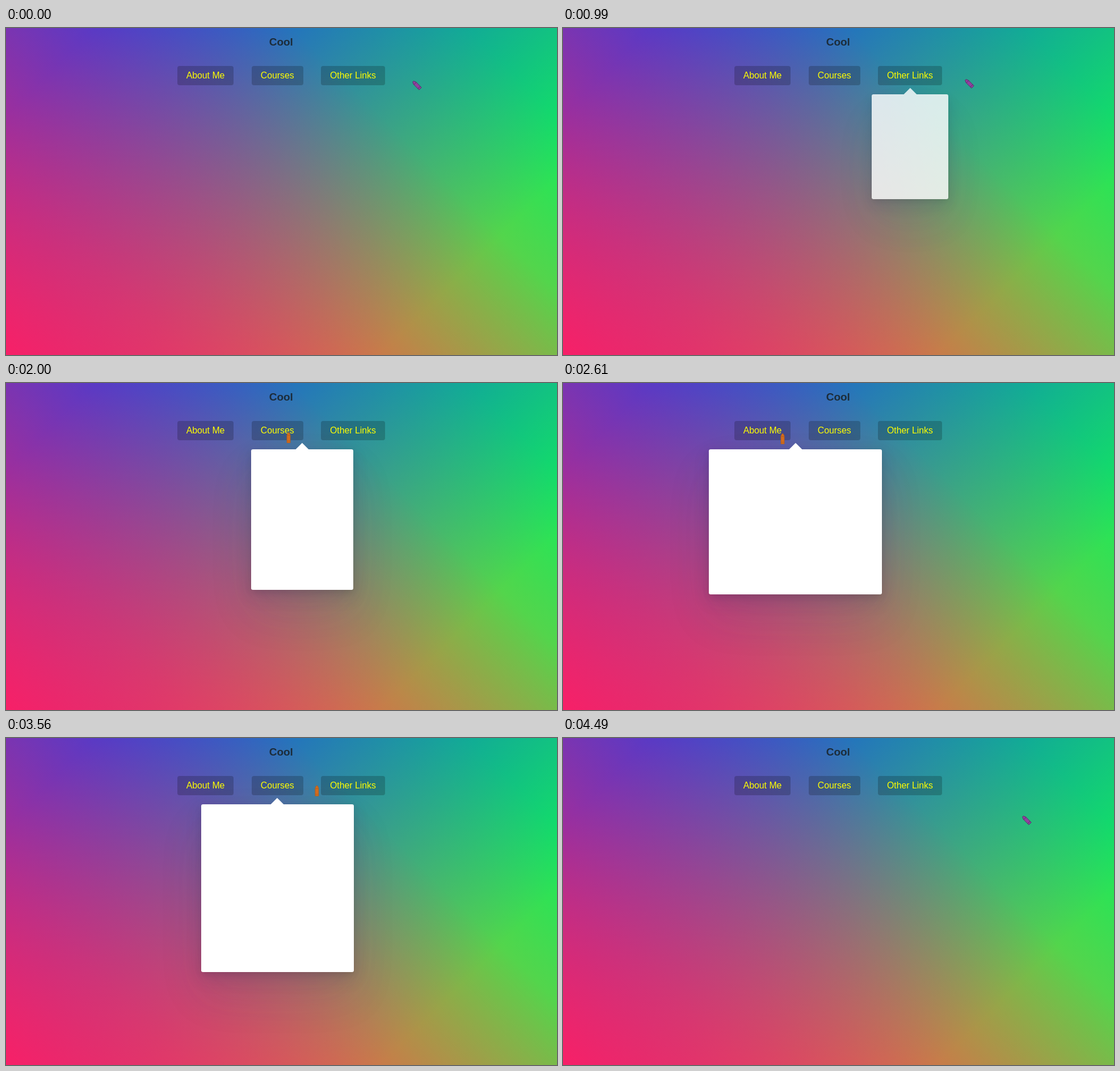
Write an HTML page that moves like this. It is 971 by 577 pixels and loops after 4.74 s.

```html
<!DOCTYPE html>
<html lang="en">
<head>
<meta charset="utf-8">
<title>Cool</title>
<style>
html, body { margin: 0; width: 100%; height: 100%; overflow: hidden; }
body {
  position: relative;
  font-family: "Liberation Sans", Arial, sans-serif;
  background:
    linear-gradient(rgba(128,128,128,.06), rgba(128,128,128,.06)),
    linear-gradient(45deg, hsla(340,100%,55%,1) 0%, hsla(340,100%,55%,0) 70%),
    linear-gradient(135deg, hsla(225,95%,50%,1) 10%, hsla(225,95%,50%,0) 80%),
    linear-gradient(225deg, hsla(140,90%,50%,1) 10%, hsla(140,90%,50%,0) 80%),
    hsl(35,95%,55%);
}
h2, nav, #panel, #links, svg { position: absolute; margin: 0; }
h2 {
  top: 14px; width: 969.6px; text-align: center;
  font-size: 19px; line-height: 22px; color: #1c2c3a;
}
nav {
  top: 67px; width: 969.6px;
  display: flex; justify-content: center; gap: 31.66px;
}
nav span {
  padding: 0 15.83px; border-radius: 4px;
  font-size: 15.83px; line-height: 34px;
  color: #ff0; background: rgba(0,0,0,.2);
}
#panel {
  background: #fff; border-radius: 3.2px;
  box-shadow: 0 40px 79px rgba(50,50,93,.1), 0 12px 28px rgba(50,50,93,.15), 0 4px 12px rgba(0,0,0,.1);
}
#panel::before {
  content: ""; position: absolute; top: -7.9px; left: calc(50% - 7.9px);
  width: 15.8px; height: 15.8px; background: #fff; transform: rotate(45deg);
}
#links { left: 559.6px; top: 130.6px; width: 103.8px; }
#links div {
  height: 30.4px; margin-bottom: 7.95px; padding-left: 7.9px;
  font-size: 12.66px; line-height: 30.4px; color: #fff; white-space: nowrap;
}
svg { inset: 0; width: 100%; height: 100%; }
</style>
</head>
<body>
<h2>Cool</h2>
<nav><span>About Me</span><span>Courses</span><span>Other Links</span></nav>
<div id="panel"></div>
<div id="links">
  <div style="background:#00aced">Quipple</div>
  <div style="background:#3b5998">Gladpine</div>
  <div style="background:#000">Blog</div>
  <div style="background:#ffc600">Course Catalog</div>
</div>
<svg>
  <g id="crayon" stroke-width=".8" stroke-linejoin="round">
    <path d="M-1 .5h2l2 4v14h-6v-14z"/>
    <path d="M-3 5.5h6M-3 15.5h6" fill="none"/>
  </g>
</svg>
<script>
const LOOP = 4740, STEP = 77;
const MOVE = 200, RESIZE = 300, FADE = 100, LINKS_DELAY = 165, LINKS_FADE = 500;
const $ = id => document.getElementById(id);

// panel box under a button's centre
const below = (center, width, height) => ({ left: center - width / 2, top: 117.3, width, height });
const start = { left: 0, top: 51, width: 79, height: 79 };
const about = below(351.5, 427.4, 118);
const courses = below(478.3, 269, 296);
const other = below(611.6, 135.4, 184.9);

// what the pointer enters, null when it leaves the menu
const hovers = [
  [460, other], [986, null], [1510, other], [1937, courses],
  [2567, about], [3122, courses], [3615, other], [4175, null]
];

// pointer turning points: time, x, y
const path = [
  [308, 717, 94], [700, 620, 88], [1001, 709, 91], [1290, 722, 97], [1750, 600, 88], [2002, 498, 87],
  [2618, 387, 89], [2950, 360, 89], [3157, 479, 86], [3850, 603, 82], [4100, 640, 86], [4340, 810, 138]
];

const clamp = x => Math.max(0, Math.min(1, x));
const mix = (a, b, p) => a + (b - a) * p;

// CSS "ease": cubic-bezier(.25, .1, .25, 1)
function ease(x) {
  x = clamp(x);
  let lo = 0, hi = 1;
  for (let i = 0; i < 24; i++) {
    const s = (lo + hi) / 2, r = 1 - s;
    if (.75 * s * r + s * s * s < x) lo = s; else hi = s;
  }
  return .3 * lo * (1 - lo) ** 2 + 3 * lo * lo * (1 - lo) + lo ** 3;
}

function menuAt(t) {
  const menu = { from: start, to: start, since: 0, wasOpen: false, open: false };
  for (const [time, box] of hovers) {
    if (time > t) break;
    menu.since = time;
    menu.wasOpen = menu.open;
    menu.open = !!box;
    menu.from = menu.to;
    menu.to = box || menu.to;
  }
  return menu;
}

function drawPanel({ from, to, since, wasOpen, open }, t) {
  const age = t - since, style = $("panel").style;
  // growing taller is quicker than shrinking
  const taller = to.height > from.height ? MOVE : RESIZE;
  const times = { left: MOVE, top: MOVE, width: RESIZE, height: taller };
  for (const k in times) style[k] = mix(from[k], to[k], ease(age / times[k])) + "px";
  style.opacity = mix(+wasOpen, +open, ease(age / FADE));
  $("links").style.opacity = open && to === other ? ease((age - LINKS_DELAY) / LINKS_FADE) : 0;
}

function drawCrayon(upright, t) {
  const i = path.findIndex(k => k[0] > t);
  const b = path.at(i), a = path[Math.max(0, i - 1)];
  const p = i < 1 ? 1 : (t - a[0]) / (b[0] - a[0]);
  const x = mix(a[1], b[1], p), y = mix(a[2], b[2], p);
  const g = $("crayon");
  g.setAttribute("transform", `translate(${x} ${y}) rotate(${upright ? 0 : -45})`);
  g.setAttribute("fill", upright ? "hsl(26,75%,47%)" : "hsl(290,42%,44%)");
  g.setAttribute("stroke", upright ? "hsl(26,75%,40%)" : "hsl(290,42%,27%)");
}

function frame(now) {
  // the screen refreshes in even steps
  const t = Math.floor((now % LOOP + 14) / STEP) * STEP;
  const menu = menuAt(t);
  drawPanel(menu, t);
  drawCrayon(menu.open, t);
  requestAnimationFrame(frame);
}
frame(0);
</script>
</body>
</html>
```
